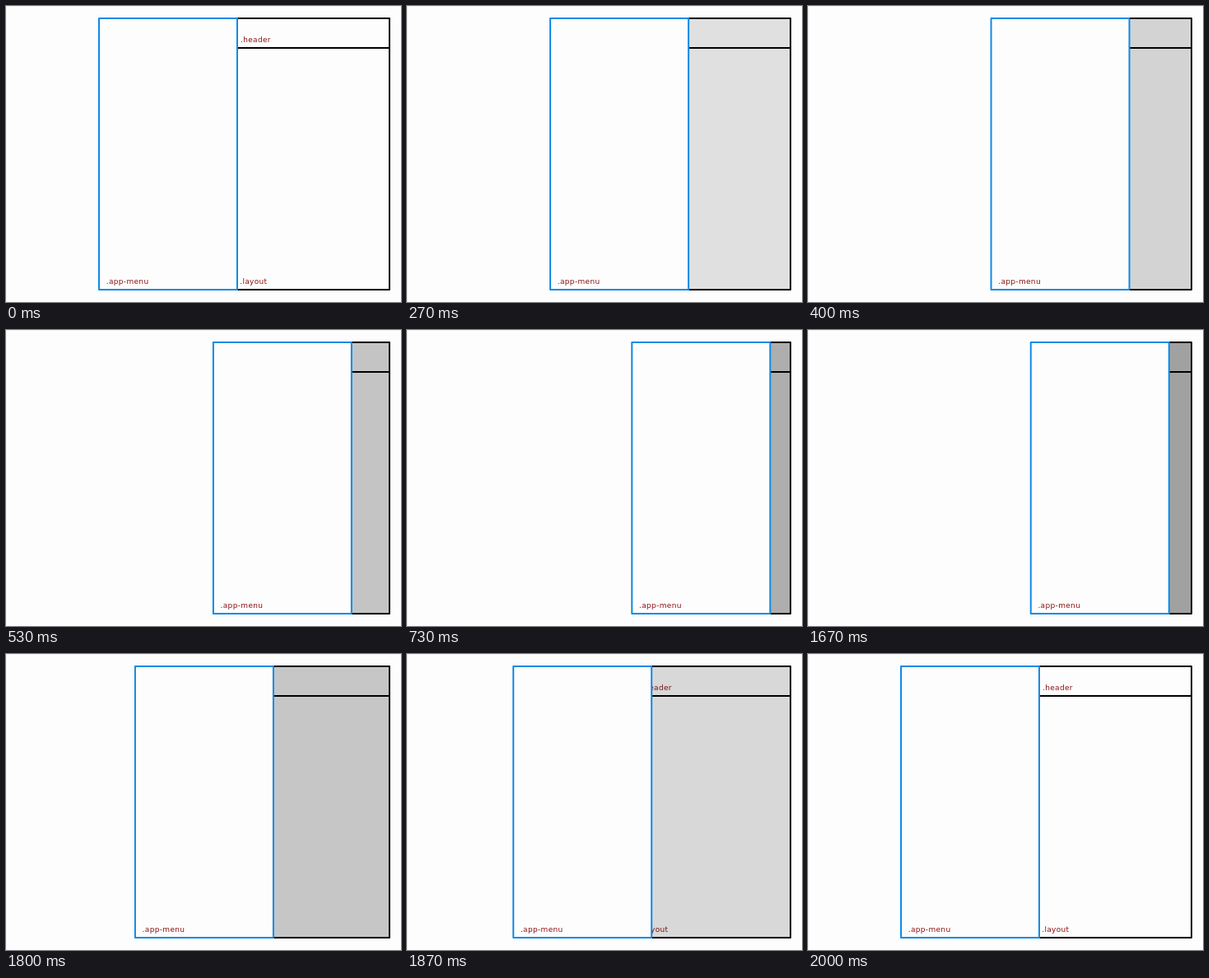
Animation of 480x360 px, one loop 3540 ms. Source, as an HTML page:

```html
<!DOCTYPE html>
<html lang="en">
<head>
<meta charset="utf-8">
<title>Sliding menu</title>
<style>
  html, body { margin: 0; width: 100%; height: 100%; overflow: hidden; background: #fdfdfd; }
  svg { display: block; width: 480px; height: 360px; }
  text { font: 9px "DejaVu Sans", Verdana, sans-serif; letter-spacing: .33px; fill: #8b1010; }
  .line { fill: none; stroke: #000; stroke-width: 2; stroke-linejoin: round; }
  .panel { fill: #fdfdfd; stroke: #0f8ae6; stroke-width: 2; stroke-linejoin: round; }
</style>
</head>
<body>
<svg viewBox="0 0 480 360">
  <path d="M0 .5H480M.5 0V360" fill="none" stroke="#f3f3f3"/>
  <text x="285" y="44">.header</text>
  <text x="284.2" y="338">.layout</text>
  <rect id="shade" x="281" y="15" width="185" height="330" opacity="0"/>
  <path class="line" d="M281 15H466V345H281ZM281 51H466"/>
  <g id="menu">
    <rect class="panel" x="113" y="15" width="168" height="330"/>
    <text x="121.7" y="338">.app-menu</text>
  </g>
</svg>
<script>
const LOOP = 3540, TICK = 1000 / 15, SHIFT = 166, DIM = 0.4;
const menu = document.getElementById('menu');
const shade = document.getElementById('shade');

const span = (t, from, to) => Math.min(1, Math.max(0, (t - from) / (to - from)));
const bezier = (s, a, b) => 3 * (1 - s) ** 2 * s * a + 3 * (1 - s) * s * s * b + s ** 3;

// CSS "ease": cubic-bezier(.25, .1, .25, 1)
function ease(p) {
  if (p <= 0 || p >= 1) return p;
  let lo = 0, hi = 1;
  for (let i = 0; i < 24; i++) {
    const mid = (lo + hi) / 2;
    if (bezier(mid, 0.25, 0.25) < p) lo = mid; else hi = mid;
  }
  return bezier(lo, 0.1, 1);
}

function draw(now) {
  // motion advances in steps of a fifteenth of a second
  const t = Math.floor((now % LOOP + 3.4) / TICK) * TICK;
  const slide = ease(span(t, 64, 938)) - ease(span(t, 1643, 2000));
  const dim = span(t, 0, 940) - span(t, 1633, 2000);
  menu.setAttribute('transform', `translate(${(SHIFT * slide).toFixed(2)} 0)`);
  shade.setAttribute('opacity', (DIM * dim).toFixed(4));
}

const start = performance.now();
function loop() {
  draw(performance.now() - start);
  requestAnimationFrame(loop);
}
loop();
</script>
</body>
</html>
```
